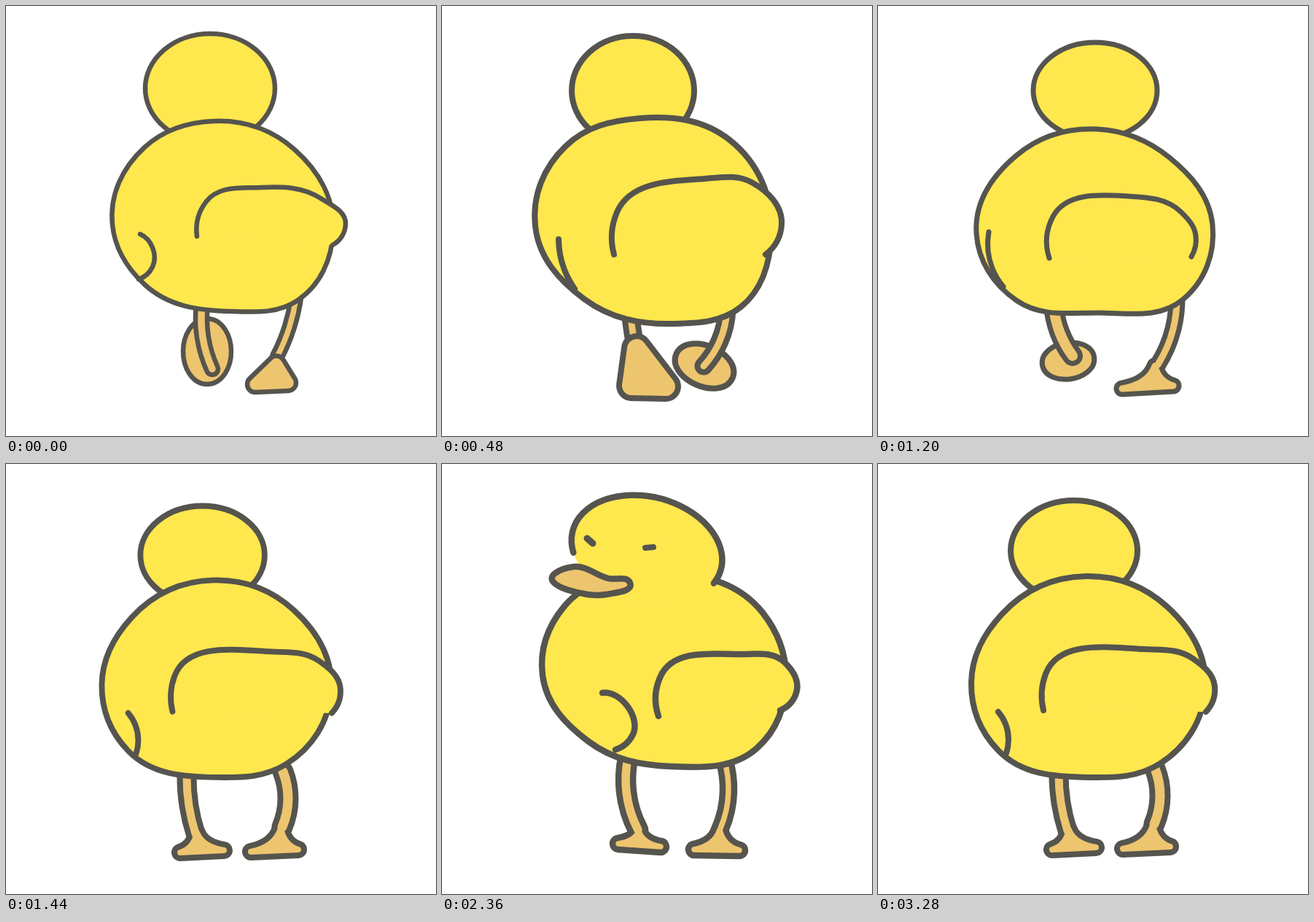
An HTML page with a canvas for the animation above (3.36 s loop, 590 by 590 pixels).

```html
<!DOCTYPE html>
<html lang="en">
<head>
<meta charset="utf-8">
<title>Walking chick</title>
<style>
html, body { margin: 0; width: 100%; height: 100%; overflow: hidden; background: #fff; }
canvas { display: block; width: 100vw; height: 100vh; }
</style>
</head>
<body>
<canvas id="stage" width="590" height="590"></canvas>
<script>
const ctx = document.getElementById('stage').getContext('2d');
const YELLOW = '#ffe74e', ORANGE = '#eec56f', INK = '#55544e';
const LOOP = 3360, STEP = 80, WALK_END = 1440;

const pts = (...v) => v.reduce((out, x, i) => i % 2 ? out : [...out, [x, v[i + 1]]], []);
const lerp = (a, b, k) => Array.isArray(a) ? a.map((v, i) => lerp(v, b[i], k)) : a + (b - a) * k;
const shift = (list, dx, dy) => list.map(([x, y]) => [x + dx, y + dy]);

// Legs are round tubes along a bone; feet are ovals or wedges.
// A foot lies in front of the leg, behind it, or is one piece with it.
const oval = (x, y, rx, ry, tilt = 0) => ({ at: [[x, y]], rx, ry, tilt, round: 20 });
const wedge = (ankle, heel, toe, round = 16, flare = 0) => ({ at: [ankle, heel, toe], round, flare });
const stem = (ankle, heel, toe) => wedge(ankle, heel, toe, 16, .3);
const leg = (order, width, bone, foot) => ({ order, width, bone, foot });
const moveLeg = (l, dx, dy) => ({
  ...l, bone: shift(l.bone, dx, dy), foot: { ...l.foot, at: shift(l.foot.at, dx, dy) }
});

// Key points run clockwise: body from the top, wing from its inner tip.
const lift = {
  line: 6.5,
  head: [280, 113, 89, 75, 0],
  body: pts(285, 158, 396, 197, 449, 310, 400, 404, 310, 419, 190, 382, 146, 300, 190, 194),
  wing: pts(262, 316, 275, 268, 350, 249, 432, 264, 466, 299, 448, 328),
  flap: pts(184, 313, 201, 358, 182, 375),
  legs: [
    leg('behind', 16, pts(269, 410, 270, 455, 283, 498), oval(276, 474, 33, 45)),
    leg('front', 14, pts(398, 400, 389, 440, 372, 481), wedge([371, 491], [342, 519], [387, 517], 22))
  ]
};

const swing = {
  line: 7,
  head: [298, 116, 85, 66, 0],
  body: pts(302, 169, 400, 208, 459, 300, 418, 403, 302, 421, 190, 404, 135, 312, 190, 205),
  wing: pts(235, 346, 240, 289, 343, 261, 415, 282, 436, 315, 430, 344),
  flap: pts(152, 310, 157, 360, 172, 385),
  legs: [
    leg('behind', 21, pts(241, 411, 249, 447, 267, 480), oval(261, 487, 36, 25, -.15)),
    leg('one', 16, pts(410, 400, 405, 443, 384, 492), stem([380, 494], [335, 525], [405, 521]))
  ]
};

const stride = {
  line: 8,
  head: [306, 116, 87, 71, 0],
  body: pts(313, 168, 394, 188, 453, 300, 400, 397, 290, 426, 185, 396, 130, 310, 150, 233),
  wing: pts(206, 364, 205, 300, 320, 261, 378, 274, 400, 295, 396, 319),
  flap: pts(147, 332, 158, 360, 176, 386),
  legs: [
    leg('front', 20, pts(251, 422, 253, 450, 264, 475), wedge([264, 486], [238, 534], [296, 525])),
    leg('behind', 16, pts(398, 396, 398, 414, 398, 431), oval(403, 427, 32, 45, .1))
  ]
};

const cross = {
  line: 8,
  head: [262, 116, 84, 75, 0],
  body: pts(272, 154, 395, 184, 452, 310, 410, 413, 318, 436, 195, 402, 128, 302, 170, 192),
  wing: pts(236, 341, 240, 283, 360, 237, 425, 242, 466, 300, 444, 341),
  flap: pts(160, 320, 168, 362, 182, 388),
  legs: [
    leg('front', 17, pts(258, 416, 260, 435, 263, 455), wedge([267, 470], [260, 521], [307, 522], 34)),
    leg('behind', 17, pts(391, 416, 381, 460, 359, 494), oval(360, 494, 42, 28, .4))
  ]
};

const stand = {
  line: 8,
  head: [269, 119, 87, 69, 0],
  body: pts(285, 154, 397, 196, 449, 310, 387, 411, 290, 430, 165, 393, 128, 300, 170, 206),
  wing: pts(227, 338, 230, 288, 365, 254, 432, 267, 462, 305, 450, 340),
  flap: pts(165, 340, 179, 378, 176, 397),
  legs: [
    leg('one', 19, pts(248, 423, 251, 465, 260, 503), stem([262, 502], [239, 529], [299, 526])),
    leg('one', 21, pts(380, 418, 387, 455, 379, 494), stem([377, 496], [336, 528], [401, 525]))
  ]
};

const look = {
  line: 8, front: true,
  head: [272, 120, 100, 75, .2],
  body: pts(270, 150, 430, 187, 463, 260, 410, 399, 290, 417, 205, 394, 124, 278, 172, 187),
  wing: pts(267, 324, 285, 273, 370, 256, 452, 272, 474, 302, 457, 336),
  flap: pts(206, 293, 258, 358, 238, 398),
  beak: pts(150, 156, 175, 142, 207, 147, 219, 162, 190, 173),
  eyes: [[188, 103, 191, 109, 11], [253, 114, 267, 110, 11]],
  legs: [
    leg('one', 20, pts(247, 406, 253, 455, 270, 502), stem([272, 504], [248, 523], [303, 520])),
    leg('one', 18, pts(382, 400, 388, 450, 379, 498), stem([379, 500], [344, 525], [405, 525]))
  ]
};

const smirk = {
  line: 8.5, front: true,
  head: [281, 118, 105, 73, .25],
  body: pts(290, 150, 440, 204, 472, 290, 432, 390, 315, 415, 200, 380, 138, 290, 168, 195),
  wing: pts(297, 346, 300, 291, 408, 261, 470, 272, 487, 310, 464, 338),
  flap: pts(220, 314, 262, 371, 238, 392),
  beak: pts(155, 150, 180, 141, 228, 157, 258, 163, 225, 179),
  eyes: [[199, 102, 207, 109, 9], [284, 116, 297, 112, 12]],
  legs: [
    leg('one', 20, pts(255, 404, 253, 450, 269, 502), stem([270, 504], [242, 521], [300, 525])),
    leg('one', 16, pts(387, 405, 393, 450, 382, 500), stem([381, 502], [346, 529], [408, 530]))
  ]
};

const wink = { ...smirk, eyes: [smirk.eyes[0], [279, 115, 290, 114, 8]] };
const turn = { ...look, squash: .97, eyes: [[224, 114, 236, 110, 11]] };
const crouch = { ...stand, squash: .98, legs: stand.legs.map(l => moveLeg(l, 0, 4)) };

function between(a, b, k, lean, legs) {
  const out = { legs };
  for (const key of ['line', 'head', 'body', 'wing', 'flap']) out[key] = lerp(a[key], b[key], k);
  return { ...out, body: shift(out.body, lean, 0) };
}

const walk = [
  lift,
  swing,
  between(swing, stride, .35, 0, [moveLeg(stride.legs[0], -3, -4), swing.legs[1]]),
  between(swing, stride, .7, -6, [stride.legs[0], moveLeg(lift.legs[0], 115, -25)]),
  stride,
  between(stride, cross, .5, -7, [moveLeg(cross.legs[0], -6, 4), moveLeg(cross.legs[1], 8, -18)]),
  cross
];

const acts = [
  [1440, crouch], [1600, turn], [1760, look], [1920, smirk], [2360, wink], [2440, smirk],
  [2560, wink], [2640, smirk], [2840, look], [3000, turn], [3160, crouch], [3280, stand]
];

// Smooth path through key points with arc-like tangents
function trace(p, closed) {
  const n = p.length, path = new Path2D();
  const seg = i => {
    const a = p[(i + n) % n], b = p[(i + 1) % n];
    const dx = b[0] - a[0], dy = b[1] - a[1], len = Math.hypot(dx, dy);
    return { a, b, len, x: dx / len, y: dy / len };
  };
  const tangent = i => {
    if (!closed && i === 0) return mirror(seg(0), tangent(1));
    if (!closed && i === n - 1) return mirror(seg(n - 2), tangent(n - 2));
    const s = seg(i - 1), t = seg(i);
    const x = s.x * t.len + t.x * s.len, y = s.y * t.len + t.y * s.len, d = Math.hypot(x, y);
    return [x / d, y / d];
  };
  const mirror = (s, [x, y]) => {
    const dot = 2 * (s.x * x + s.y * y);
    return [dot * s.x - x, dot * s.y - y];
  };
  path.moveTo(...p[0]);
  for (let i = 0; i < (closed ? n : n - 1); i++) {
    const { a, b, len } = seg(i), u = tangent(i), v = tangent((i + 1) % n), h = len * .36;
    path.bezierCurveTo(a[0] + u[0] * h, a[1] + u[1] * h, b[0] - v[0] * h, b[1] - v[1] * h, ...b);
  }
  if (closed) path.closePath();
  return path;
}

function shape(path, color) {
  ctx.fillStyle = color;
  ctx.fill(path);
  ctx.stroke(path);
}

function headPath([x, y, rx, ry, tilt], from = 0, to = Math.PI * 2) {
  const path = new Path2D();
  path.ellipse(x, y, rx, ry, tilt, from, to);
  return path;
}

function footPath({ at, rx, ry, tilt, round, flare }) {
  const path = new Path2D(), [top, heel, toe] = at;
  if (rx) {
    path.ellipse(...top, rx - round / 2, ry - round / 2, tilt, 0, Math.PI * 2);
    return path;
  }
  const bend = end => [lerp(top[0], end[0], .5 - flare), lerp(top[1], end[1], .5 + flare)];
  path.moveTo(...top);
  path.quadraticCurveTo(...bend(heel), ...heel);
  path.lineTo(...toe);
  path.quadraticCurveTo(...bend(toe), ...top);
  path.closePath();
  return path;
}

// Ink outside, then the colour inside, over all parts at once
function coat(parts, line) {
  for (const [color, grow] of [[INK, line], [ORANGE, -line]]) {
    ctx.fillStyle = ctx.strokeStyle = color;
    for (const { path, width, solid } of parts) {
      ctx.lineWidth = width + grow;
      if (solid) ctx.fill(path);
      ctx.stroke(path);
    }
  }
}

function drawLeg({ order, width, bone, foot }, line) {
  const tube = { path: trace(bone), width };
  const sole = { path: footPath(foot), width: foot.round, solid: true };
  const groups = { one: [[tube, sole]], front: [[tube], [sole]], behind: [[sole], [tube]] };
  groups[order].forEach(parts => coat(parts, line));
}

function drawFace({ head, beak, eyes, line }) {
  ctx.fillStyle = YELLOW;
  ctx.fill(headPath(head));
  ctx.stroke(headPath(head, Math.PI - .4, Math.PI * 2 + .3));
  shape(trace(beak, true), ORANGE);
  for (const [x1, y1, x2, y2, width] of eyes) {
    ctx.lineWidth = width;
    ctx.beginPath();
    ctx.moveTo(x1, y1);
    ctx.lineTo(x2, y2);
    ctx.stroke();
  }
  ctx.lineWidth = line;
}

function draw(p) {
  ctx.fillStyle = '#fff';
  ctx.fillRect(0, 0, 590, 590);
  ctx.lineCap = ctx.lineJoin = 'round';
  p.legs.forEach(l => drawLeg(l, p.line));

  const k = p.squash || 1;
  ctx.save();
  ctx.translate(300 * (1 - k), 425 * (1 - k));
  ctx.scale(k, k);
  ctx.strokeStyle = INK;
  ctx.lineWidth = p.line;
  if (!p.front) shape(headPath(p.head), YELLOW);
  shape(trace(p.body, true), YELLOW);
  if (p.front) drawFace(p);
  shape(trace(p.wing), YELLOW);
  ctx.stroke(trace(p.flap));
  ctx.restore();
}

function poseAt(t) {
  if (t < WALK_END) return walk[Math.floor(t / STEP) % walk.length];
  return acts.filter(([start]) => t >= start).pop()[1];
}

const begin = performance.now();
function tick() {
  draw(poseAt((performance.now() - begin) % LOOP));
  requestAnimationFrame(tick);
}
tick();
</script>
</body>
</html>
```
